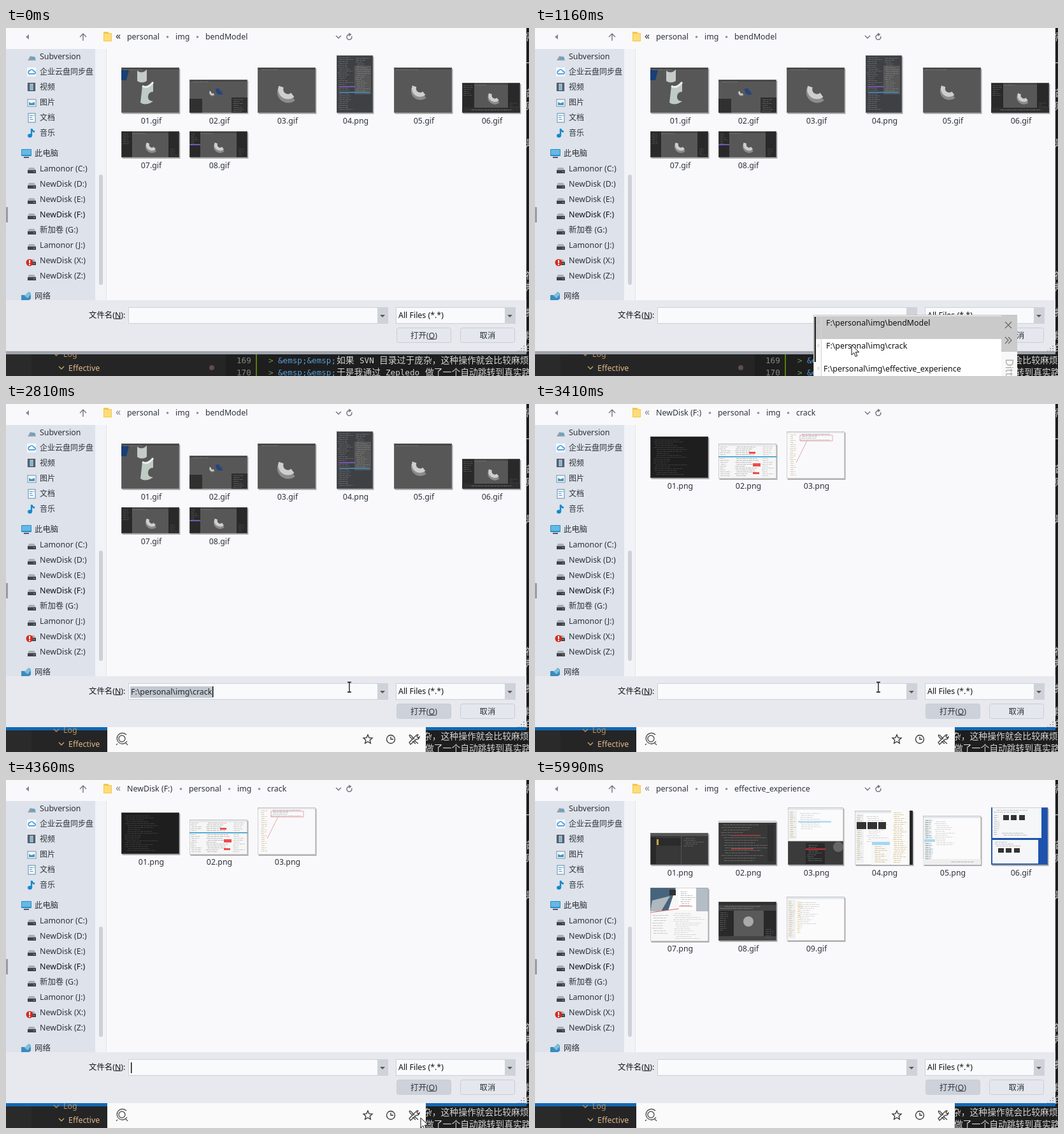
Write an HTML page that moves like this. It is 821 px wide and 546 px high and loops after 6140 ms.

```html
<!DOCTYPE html>
<html lang="zh">
<head>
<meta charset="utf-8">
<title>Open file dialog</title>
<style>
html, body { margin: 0; width: 100%; height: 100%; overflow: hidden; background: #1e1e1e; }
svg { display: block; width: 100vw; height: 100vh; }
text { font: 12.4px "Noto Sans", "Noto Sans CJK SC", "Noto Sans CJK", sans-serif; white-space: pre; }
.code { font: 12.6px "DejaVu Sans Mono", monospace; }
.cjk { font: 13.8px "Noto Sans CJK SC", "Noto Sans CJK", sans-serif; }
.cn { font-size: 12px; }
.tiny { font-size: 6px; }
</style>
</head>
<body>
<svg id="stage" viewBox="0 0 821 546" xmlns="http://www.w3.org/2000/svg"></svg>
<script>
const LOOP = 6140;
const INK = '#2d323b';
const PAPER = '#f9f9fb';

const rect = (x, y, w, h, fill, extra = '') =>
  `<rect x="${x}" y="${y}" width="${w}" height="${h}" fill="${fill}" ${extra}/>`;
const path = (d, fill, stroke = 'none', width = 1, extra = '') =>
  `<path d="${d}" fill="${fill}" stroke="${stroke}" stroke-width="${width}" ${extra}/>`;
const circle = (x, y, r, fill, extra = '') => `<circle cx="${x}" cy="${y}" r="${r}" fill="${fill}" ${extra}/>`;
const text = (x, cy, s, fill = INK, extra = '') =>
  `<text x="${x}" y="${cy + 4.5}" fill="${fill}" ${extra}>${s.replace(/&/g, '&amp;')}</text>`;
const centered = (x, cy, s, fill = INK) => text(x, cy, s, fill, 'text-anchor="middle"');
const group = (id, body) => `<g id="${id}">${body}</g>`;
const at = (x, y, body, scale = 1) => `<g transform="translate(${x} ${y}) scale(${scale})">${body}</g>`;

let seed = 7;
const random = () => (seed = seed * 16807 % 2147483647) / 2147483647;

// Rows of small dashes that read as distant text.
function scribble(x, y, w, h, color, gap = 3, opacity = .5) {
  let d = '';
  for (let row = y + 1; row < y + h; row += gap) {
    const start = x + random() * w * .1;
    d += `M${start.toFixed(1)} ${row + .5}h${((x + w - start) * (.4 + random() * .6)).toFixed(1)}`;
  }
  return path(d, 'none', color, 1, `opacity="${opacity}" stroke-dasharray="5 1 3 1"`);
}

// Bent cylinder seen in the model previews.
const arch = (x, y, s = 1) => at(x, y,
  path('M-8 -5C-12 8 2 17 12 9', 'none', '#8c8c8c', 9) +
  path('M-7 -9C-11 3 2 11 11 4', 'none', '#cecece', 8), s);

const card = (x, y, w, h, fill, body = '') =>
  rect(x + 1.5, y + 2, w, h, '#666', 'opacity=".5"') + rect(x, y, w, h, fill) + body +
  rect(x + .5, y + .5, w - 1, h - 1, 'none', 'stroke="#888" stroke-opacity=".35"');

function scene(x, y, w, h, panel = 0) {
  let body = rect(x, y, w, 3, '#454545') + scribble(x + 3, y + 2, w * .4, 3, '#999');
  if (panel) body += rect(x, y, panel, h, '#292929') + rect(x + w - panel, y, panel, h, '#292929') +
    scribble(x + 2, y + 3, panel - 4, h * .4, '#777') + scribble(x + w - panel + 2, y + h * .65, panel - 4, h * .3, '#666');
  return card(x, y, w, h, '#575757', body);
}

const sheet = (x, y, w, h) => card(x, y, w, h, '#fbfbfb',
  rect(x, y, w, 4, '#e4e7eb') + rect(x + 1, y + 5, 13, h - 8, '#eef0f2') +
  scribble(x + 3, y + 6, 10, h - 12, '#b58f45', 3) + scribble(x + 18, y + 8, w * .4, h * .5, '#888', 3, .35));

const black = (x, y, w, h) => rect(x, y, w, h, '#292929');
const labels = (names, cy) => names.map((name, i) => centered(228 + 107 * i, cy, name)).join('');

const crumbs = items => items.map(([x, s], i) =>
  (i ? circle(x - 12.5, 14, 1.8, '#8b909a') : '') + text(x, 13.5, s)).join('');

const bendFolder = () =>
  crumbs([[190, 'personal'], [266, 'img'], [313, 'bendModel']]) +
  scene(181, 62, 91, 71) +
  path('M181 66h12l-4 16h-8z', '#193f75') +
  path('M206 67q8 6 15-2v18q-8 5-15 0z', '#c5cbc8') +
  path('M214 91q8 5 17-6v15q-7 0-8 7t8 8q-12 8-20 2z', '#bfcbc5') +
  path('M214 91q8 5 17-6', 'none', '#eee', 3) +
  scene(288, 81, 91, 52) + rect(288, 111, 20, 22, '#303030') + rect(354, 109, 25, 24, '#303030') +
  scribble(356, 111, 20, 20, '#888') + arch(323, 102, .3) +
  path('M332 95q0 9 7 6', 'none', '#24467f', 6) +
  scene(395, 62, 91, 71) + arch(439, 101) +
  card(519, 43, 57, 90, '#3e4044', rect(547, 59, 26, 45, '#575757') +
    scribble(521, 45, 25, 85, '#909090') + scribble(549, 46, 24, 54, '#999') +
    rect(523, 91, 25, 2, '#7754b4') + rect(523, 100, 48, 2, '#4681ac')) +
  scene(609, 62, 91, 71) + arch(647, 99, .85) +
  scene(716, 86, 91, 47, 19) + arch(765, 109, .65) + rect(716, 125, 91, 8, '#303030') +
  scribble(724, 127, 75, 3, '#aaa') +
  scene(181, 162, 91, 41, 17) + arch(227, 186, .6) +
  scene(288, 162, 91, 41, 17) + arch(334, 186, .6) + rect(288, 182, 17, 2, '#7656b5') +
  labels(['01.gif', '02.gif', '03.gif', '04.png', '05.gif', '06.gif'], 145) +
  labels(['07.gif', '08.gif'], 215);

const crackFolder = () =>
  crumbs([[190, 'NewDisk (F:)'], [287, 'personal'], [363, 'img'], [410, 'crack']]) +
  card(181, 51, 91, 65, '#1e1e1e', scribble(186, 55, 55, 58, '#777', 3, .35)) +
  card(288, 62, 91, 55, '#f6f6f6', rect(288, 62, 91, 4, '#e5e7ea') + scribble(290, 66, 18, 48, '#888') +
    scribble(313, 66, 38, 48, '#777') + scribble(356, 66, 20, 48, '#999') +
    rect(288, 82, 91, 1.5, '#2499c9') + rect(336, 75, 10, 3, '#ef4c4c') +
    rect(342, 93, 12, 5, '#ef4c4c') + rect(342, 107, 10, 3, '#ef4c4c')) +
  card(395, 43, 91, 74, PAPER, rect(395, 43, 91, 3, '#e5e7ea') + scribble(400, 47, 12, 67, '#b59a5d') +
    scribble(415, 46, 50, 11, '#777') + path('M416 49h51v9h-51zM427 58L410 92', 'none', '#e8a5a5')) +
  labels(['01.png', '02.png', '03.png'], 128);

const effectiveFolder = () =>
  crumbs([[190, 'personal'], [266, 'img'], [313, 'effective_experience']]) +
  card(181, 83, 91, 50, '#383838', rect(181, 83, 91, 5, '#555') + black(181, 90, 9, 42) +
    rect(191, 91, 39, 12, '#2b2b2b') + rect(191, 93, 3, 9, '#c5a34d') + rect(229, 88, 1, 45, '#555') +
    scribble(233, 90, 36, 16, '#888')) +
  card(288, 64, 91, 69, '#383838', rect(288, 64, 91, 3, '#ddd') + scribble(292, 69, 80, 60, '#969696', 4) +
    rect(308, 86, 46, 2, '#8d4040') + rect(308, 107, 35, 2, '#9d4343') + rect(365, 70, 10, 58, '#303030')) +
  sheet(397, 43, 87, 53) + rect(413, 64, 52, 3, '#b9dff5') +
  card(397, 96, 87, 37, '#3b3b3b', rect(425, 99, 30, 33, '#292929') +
    scribble(427, 101, 26, 28, '#999') + rect(425, 107, 31, 3, '#9b3039') + circle(476, 105, 8, '#666')) +
  sheet(502, 48, 91, 85) + rect(505, 66, 15, 11, '#333') + rect(522, 66, 15, 11, '#333') + rect(539, 66, 12, 11, '#333') +
  rect(528, 91, 30, 42, '#f7f7f7') + rect(529, 97, 28, 5, '#a6d5f2') + scribble(532, 103, 22, 28, '#b18e46') +
  rect(559, 48, 29, 85, '#fafafa') + scribble(562, 50, 23, 80, '#ba8d3d') + rect(588, 48, 5, 85, '#272727') +
  sheet(609, 56, 91, 77) + scribble(612, 62, 13, 65, '#397f9b') + rect(611, 93, 17, 4, '#add7ec') +
  rect(609, 124, 91, 9, '#eee') + scribble(650, 127, 45, 3, '#777') +
  card(716, 43, 89, 90, '#1d52ae', rect(718, 43, 77, 48, '#f5f6f8') + rect(718, 94, 72, 37, '#f5f6f8') +
    [735, 747, 760].map(x => rect(x, 55, 9, 8, '#333') + rect(x - 8, 107, 9, 7, '#333')).join('') +
    scribble(720, 46, 68, 6, '#888') + scribble(720, 54, 10, 34, '#888') +
    scribble(720, 96, 48, 8, '#888') + scribble(733, 82, 50, 7, '#777')) +
  card(181, 169, 91, 84, '#f7f7f7', path('M181 169h40l-12 36h-28z', '#46647d') + path('M184 189l28-7-14 24h-17z', '#aeb8bd') +
    rect(225, 169, 28, 35, '#fff') + rect(211, 172, 10, 9, '#333') + rect(253, 169, 19, 37, '#b4bcc5') +
    scribble(228, 174, 24, 25, '#777') + scribble(217, 208, 52, 42, '#999', 3, .35) + scribble(184, 211, 27, 32, '#777', 4, .4) +
    path('M226 198h21M226 202L181 208', 'none', '#df7070')) +
  card(288, 191, 91, 61, '#444', rect(288, 191, 91, 5, '#303030') + scribble(291, 197, 85, 6, '#aaa') +
    black(288, 205, 24, 40) + rect(312, 205, 47, 40, '#595959') + black(359, 205, 20, 40) +
    scribble(290, 207, 15, 30, '#888') + scribble(361, 233, 15, 16, '#777') + circle(335, 222, 8, '#aaa')) +
  sheet(395, 183, 91, 69) + scribble(411, 190, 9, 52, '#d1a13c') +
  labels(['01.png', '02.png', '03.png', '04.png', '05.png', '06.gif'], 145) +
  labels(['07.png', '08.gif', '09.gif'], 264);

const drive = y => path(`M36 ${y}h8l3 4v4H34v-4z`, '#aaaeb5') + rect(34, y + 4, 13, 5, '#3f4349') +
  rect(43, y + 6, 2, 1, '#70cb7c');

const monitor = (x, y) => rect(x, y, 16, 11, '#278bc6', 'rx="1"') + rect(x + 1, y + 1, 14, 8, '#65b9e4') +
  path(`M${x + 4} ${y + 13}h8`, 'none', '#557', 2);

function sidebar() {
  const places = ['Subversion', '企业云盘同步盘', '视频', '图片', '文档', '音乐'];
  const drives = ['Lamonor (C:)', 'NewDisk (D:)', 'NewDisk (E:)', 'NewDisk (F:)', '新加卷 (G:)', 'Lamonor (J:)', 'NewDisk (X:)', 'NewDisk (Z:)'];
  return rect(0, 33, 140, 394, '#dee2ea') + rect(140, 33, 17, 394, '#f2f3f7') + rect(157, 33, 1, 394, '#e2e4ea') +
    rect(146, 230, 6, 173, '#cdd0d7', 'rx="3"') + rect(0, 281, 3, 24, '#999ca2') +
    places.map((s, i) => text(53, 44 + 24 * i, s, INK, i ? 'class="cn"' : '')).join('') +
    path('M34 51l4-7 7 1 2 6z', '#9ba2ab') + rect(38, 46, 8, 3, '#5ba6cd') +
    rect(33, 62, 14, 14, '#f5f9ff') + path('M36 72a3 3 0 0 1 1-5a4 4 0 0 1 7 1a2 2 0 0 1 0 4z', 'none', '#278bd4', 1.4) +
    rect(34, 86, 12, 13, '#34383e') + rect(37, 87, 6, 11, '#8db5d1') + path('M35.5 87v12M44.5 87v12', 'none', '#ddd', 1, 'stroke-dasharray="1 1"') +
    rect(34, 112, 13, 11, '#f4f6f8', 'stroke="#7c8d9d"') + path('M36 121v-5l4 2 5-2v5z', '#3b9aca') +
    rect(35, 134, 11, 14, '#f6f8fa', 'stroke="#5d8fae"') + scribble(37, 136, 8, 10, '#378fc0', 3, .9) +
    path('M40 158v11M40 158q1 4 5 5', 'none', '#1689cc', 2.4) +
    '<ellipse cx="37.5" cy="169" rx="3.5" ry="3" fill="#1689cc"/>' +
    monitor(24, 190) + text(45, 196, '此电脑') +
    drives.map((s, i) => drive(219 + 24 * i) + text(53, 220 + 24 * i, s, i === 3 ? '#101216' : INK)).join('') +
    circle(37, 368, 5.5, '#d32c20') + rect(36, 364, 2, 5, '#fff') + rect(36, 370, 2, 2, '#fff') +
    path('M24 419h7l5-5 3 3v8l-5 3H24z', '#398cbd') + path('M29 420l6-6 4 4-5 6z', '#80bedd') + text(45, 420, '网络');
}

const header = () =>
  path('M36 10l-5 4 5 4z', '#858a94') +
  path('M121 20V9M116 14l5-5 5 5', 'none', '#70757e', 1.4) +
  path('M153 6h7l2 2h4v13h-13z', '#f4c64e') + rect(154, 9, 11, 11, '#ffdc78') +
  path('M518 12l4 4 4-4M540 10.5a4 4 0 1 0 2.6 2.4', 'none', '#6d727b', 1.4) + path('M538 7.5l4.5 2.5-4 3z', '#6d727b');

const combo = (x, right) =>
  rect(x + .5, 438.5, right - x - 1, 25, '#f9fafc', 'stroke="#cdd0d7"') + rect(right - 17, 438, 17, 25, '#cfd2d9') +
  path(`M${right - 13} 450h8l-4 4z`, '#555960');

const button = (x, fill, id = '') => rect(x + .5, 470.5, 85, 23, fill, `rx="3" stroke="#c9cdd5" id="${id}"`);

function footer() {
  return rect(0, 427, 817, 80, '#e7e9ef') +
    text(130, 450, '文件名(<tspan text-decoration="underline">N</tspan>):', '#111') +
    combo(192, 600) + combo(612, 800) + text(616, 450, 'All Files (*.*)', '#111') +
    button(613, '#e4e7ed', 'open') + button(713, '#e4e7ed') +
    centered(656, 482, '打开(<tspan text-decoration="underline">O</tspan>)') + centered(756, 482, '取消') +
    path('M813 498v2M809 502v2M813 502v2M805 506v1M809 506v1M813 506v1', 'none', '#a7abb3', 2);
}

function editor() {
  const code = (x, y, s, fill) => text(x, y, s, fill, 'class="code"');
  const cjk = (x, y, s) => text(x, y, s, '#d4d4d4', 'class="cjk"');
  const row = (y, n) => code(362, y, n, '#858585') + code(412, y, '>', '#6a9955') + code(427, y, '&emsp;&emsp;', '#569cd6');
  return rect(0, 0, 821, 546, '#1e1e1e') + rect(0, 507, 345, 39, '#252526') + rect(0, 507, 40, 39, '#2a2a2b') +
    rect(392, 507, 2, 39, '#587c0c') +
    path('M83 531l4 4 4-4', 'none', '#c9a96b', 1.3) + text(98, 533, 'Effective', '#e2b98a') +
    circle(323, 533, 4, '#614b4b') +
    row(521, '169') + cjk(519, 521, '如果') + code(555, 521, 'SVN', '#d4d4d4') + cjk(586, 521, '目录过于庞杂，这种操作就会比较麻烦') +
    row(540, '170') + cjk(519, 540, '于是我通过') + code(596, 540, 'Zepledo', '#d4d4d4') + cjk(658, 540, '做了一个自动跳转到真实路') +
    [...'需一首则是符规打能的'].map((c, i) => cjk(816, [14, 55, 102, 122, 180, 388, 406, 446, 482, 502][i], c)).join('');
}

function panel() {
  return rect(159, 507, 500, 39, '#fafafa') +
    path('M189 519a8.5 8.5 0 1 0 1 10M175 533l-2 2M187 531l4 4', 'none', '#555', 1.4) +
    circle(182, 525, 5, 'none', 'stroke="#555" stroke-width="1.4"') +
    path('M568 519l2 4.6 5 .5-3.8 3.3 1.2 5-4.4-2.7-4.4 2.7 1.2-5-3.8-3.3 5-.5z', 'none', '#333', 1.3) +
    circle(604, 526, 6.5, 'none', 'stroke="#333" stroke-width="1.3"') + path('M604 522v4h4', 'none', '#333', 1.3) +
    path('M633 531l10-10a4 4 0 0 1 4-2l-2 3 2 2 2-2a4 4 0 0 1-5 4l-9 8zM633 519l3 1 5 6M641 528l6 5M633 519l1 3 4 4M638 529l5 4', 'none', '#333', 1.2);
}

function menu() {
  const names = [0, 1, 2].map(i => text(i === 2 ? 16 : 20, 12.5 + 36 * i, '', '#111', `id="row${i}"`)).join('');
  return rect(0, 0, 320, 100, '#f8f8f8') + rect(12, 2, 283, 98, '#fff') + rect(295, 0, 25, 58, '#cbcbcb') +
    rect(4, 2, 316, 36, '#cacaca', 'id="hover"') +
    rect(0, 0, 320, 1, '#c4c4c4') + rect(0, 0, 1, 100, '#bbb') + rect(1.5, 3, 2.5, 71, '#292929') + rect(12, 2, 1, 98, '#d5d5d5') +
    [1, 2, 3].map(n => text(6, 36 * n - 27, '' + n, '#aaa', 'class="tiny"')).join('') + names +
    path('M301 11l10 10M311 11l-10 10M301 35l5 5-5 5M306 35l5 5-5 5', 'none', '#666', 1.2) +
    '<text transform="translate(302 69) rotate(90)" fill="#aaa" style="font-size:16px">Ditto</text>';
}

const field = () =>
  rect(195, 443, 130, 18, '#c3c9d1', 'id="selection"') + text(196, 451, '', '#24272d', 'id="entry"') +
  rect(196, 443, 1.5, 17, '#111', 'id="caret"');

document.getElementById('stage').innerHTML =
  editor() + group('activeEdge', rect(0, 507, 817, 5, '#1268b3')) +
  path('M75 510l4 4 4-4', 'none', '#b08c5c', 1.3) + text(90, 511, 'Log', '#b9925f') +
  rect(0, 0, 817, 507, PAPER) + group('idleEdge', rect(0, 507, 817, 5, '#9fa4ad')) + rect(816, 0, 1, 507, '#d4d6db') +
  header() + text(172, 13, '«', INK, 'id="back" style="font-size:16px"') + sidebar() + footer() +
  group('bend', bendFolder()) + group('crack', crackFolder()) + group('effective', effectiveFolder()) +
  group('field', field()) + group('panel', panel()) + group('menu', menu()) +
  group('arrow', path('M0 0v16l3.7-3.6 2.5 6 2.6-1.1-2.5-5.8h5.2z', '#fff', '#111', 1)) +
  group('beam', path('M-3 -7.5h2.5l.5 1 .5-1H3M0 -6.5V7M-3 8h2.5l.5-1 .5 1H3', 'none', '#111', 1.3));

const el = id => document.getElementById(id);
const show = (id, on) => { el(id).style.display = on ? '' : 'none'; };
const within = (t, a, b) => t >= a && t < b;
const ROOT = 'F:\\personal\\img\\';

const pointer = [
  [70, 650, 545], [550, 435, 449], [850, 435, 449], [1160, 497, 497], [1330, 490, 506],
  [1560, 490, 506], [1700, 496, 508], [1870, 490, 506], [2260, 490, 506], [2420, 330, 444],
  [2590, 539, 444], [3570, 539, 444], [3810, 642, 518], [3970, 650, 528],
  [4190, 651, 530], [5600, 651, 530], [5990, 738, 546]
];

function pointerAt(t) {
  const i = pointer.findIndex(p => p[0] > t);
  if (i < 1) return null;
  const [t0, x0, y0] = pointer[i - 1], [t1, x1, y1] = pointer[i];
  const k = (t - t0) / (t1 - t0);
  return [x0 + (x1 - x0) * k, y0 + (y1 - y0) * k];
}

function draw(t) {
  const firstMenu = within(t, 850, 2020), secondMenu = within(t, 3570, 4270);
  const menuOpen = firstMenu || secondMenu;
  const active = t >= 310 && !menuOpen;

  show('bend', t < 2890);
  show('crack', within(t, 2890, 5070));
  show('effective', t >= 5070);
  show('activeEdge', active);
  show('idleEdge', !active);
  show('panel', active && t >= 2020);
  el('open').setAttribute('fill', active ? '#cdd1d9' : '#e4e7ed');
  el('back').setAttribute('fill', active ? '#81868f' : INK);

  show('menu', menuOpen);
  if (menuOpen) {
    const names = firstMenu ? ['bendModel', 'crack'] : ['crack', 'bendModel'];
    [...names, 'effective_experience'].forEach((s, i) => { el('row' + i).textContent = ROOT + s; });
    const row = firstMenu ? +(t >= 1240) : t >= 4050 ? 2 : 0;
    el('hover').setAttribute('y', 2 + 36 * row);
    el('hover').setAttribute('width', row ? 291 : 316);
    el('menu').setAttribute('transform', firstMenu ? 'translate(437 450)' : 'translate(540 445)');
  }

  const typed = within(t, 2100, 2890) ? 'crack' : within(t, 4450, 5070) ? 'effective_experience' : '';
  const width = typed === 'crack' ? 130 : 217;
  el('entry').textContent = typed && ROOT + typed;
  show('selection', typed);
  el('selection').setAttribute('width', width);
  el('caret').setAttribute('x', typed ? 195 + width - 1 : 196);
  show('caret', active && !within(t, 3410, 3570) && t < 5680);

  const spot = pointerAt(t);
  const overField = spot && !menuOpen && within(spot[0], 192, 583) && within(spot[1], 438, 463);
  show('arrow', spot && !overField);
  show('beam', overField);
  if (spot) for (const id of ['arrow', 'beam'])
    el(id).setAttribute('transform', `translate(${spot[0].toFixed(1)} ${spot[1].toFixed(1)})`);
}

function tick() {
  draw(performance.now() % LOOP);
  requestAnimationFrame(tick);
}
tick();
</script>
</body>
</html>
```
